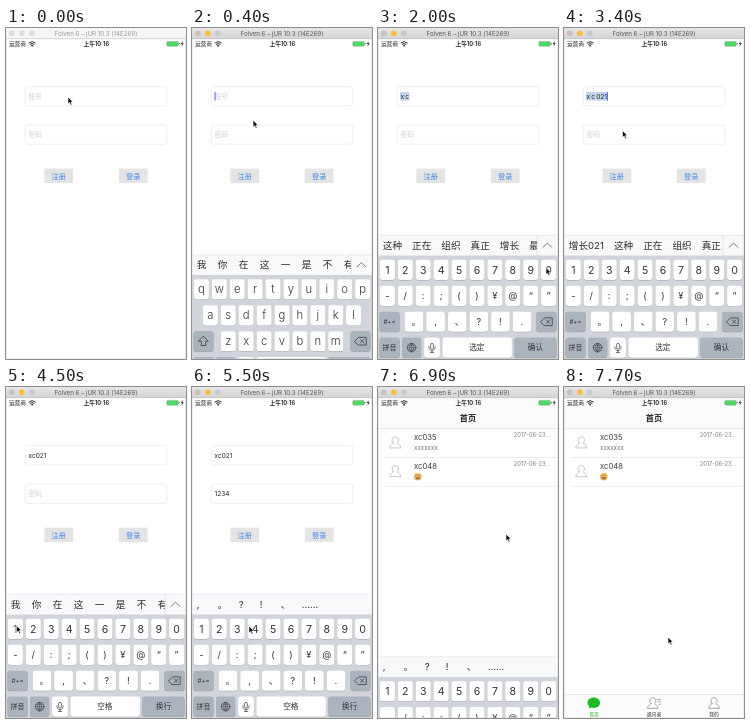
These frames come from a looping animation (180x331 px, 8 s). An HTML page:

```html
<!DOCTYPE html>
<html lang="zh-CN">
<head>
<meta charset="utf-8">
<title>登录演示</title>
<style>
  html, body { margin: 0; width: 100%; height: 100%; overflow: hidden; background: #fff; }
  svg { display: block; width: 180px; height: 331px; }
  text { font-family: Inter, "Noto Sans CJK SC", "Noto Sans CJK", sans-serif; white-space: pre; }
  .line { fill: none; stroke-linecap: round; stroke-linejoin: round; }
</style>
</head>
<body>
<svg id="stage" viewBox="0 0 180 331" xmlns="http://www.w3.org/2000/svg">
  <defs>
    <linearGradient id="chrome" x2="0" y2="1">
      <stop stop-color="#e6e6e6"/><stop offset="1" stop-color="#d3d3d3"/>
    </linearGradient>
    <clipPath id="barClip"><rect id="barWindow" y="409" width="331" height="42"/></clipPath>
    <clipPath id="screenClip"><rect width="375" height="667"/></clipPath>
  </defs>
  <rect width="180" height="331" fill="#fff"/>
  <!-- The phone screen is laid out in its own 375 x 667 points -->
  <g transform="translate(0 11) scale(.48)" clip-path="url(#screenClip)">
    <g id="login"></g>
    <g id="home"></g>
    <g id="status"></g>
    <g id="keyboard"></g>
  </g>
  <g id="titleBar"></g>
  <path d="M.25 10V330.75H179.75V10" fill="none" stroke="#d4d4d4" stroke-width=".5"/>
  <path id="cursor" d="M0 0V7L1.6 5.6L2.8 8.2L4 7.6L2.9 5.1H5Z" fill="#111" stroke="#fff" stroke-width=".6"/>
</svg>
<script>
const LOOP = 8000, STEP = 100;
const $ = id => document.getElementById(id);

const label = (str, x, y, size, fill = '#222', anchor = 'middle', weight = 400, id = '') =>
  `<text ${id && `id="${id}"`} x="${x}" y="${y + size * .36}" font-size="${size}" fill="${fill}"
    text-anchor="${anchor}" font-weight="${weight}">${str}</text>`;
const box = (x, y, w, h, fill, r = 0, extra = '') =>
  `<rect x="${x}" y="${y}" width="${w}" height="${h}" rx="${r}" fill="${fill}" ${extra}/>`;
const line = (d, color, width = 1.5) =>
  `<path class="line" d="${d}" stroke="${color}" stroke-width="${width}"/>`;
const show = (id, on) => $(id).setAttribute('visibility', on ? 'visible' : 'hidden');

// ---- window title and status bar
const dots = colors => colors.map((c, i) =>
  `<circle cx="${5.8 + i * 10}" cy="5.3" r="2.8" fill="${c}"/>`).join('');
$('titleBar').innerHTML =
  box(0, 0, 180, 11, '#f6f6f6', 0, 'id="chromeFill"') +
  '<path d="M0 10.7H180" stroke="#bdbdbd" stroke-width=".6"/>' +
  `<g id="idleDots">${dots(['#dcdcdc', '#dcdcdc', '#dcdcdc'])}</g>` +
  `<g id="liveDots">${dots(['#cbbfb8', '#fdbc40', '#c9c9c9'])}</g>` +
  label('Folven 6 – jUR 10.3 (14E269)', 90, 5.4, 6.2, '#555', 'middle', 400, 'windowTitle');

$('status').innerHTML =
  label('运营商', 6, 10, 12, '#222', 'start') +
  line('M48 8Q54.5 2.5 61 8M50.5 11Q54.5 7.5 58.5 11', '#222', 2) +
  '<circle cx="54.5" cy="14" r="1.8" fill="#222"/>' +
  label('上午10:16', 188, 10, 12, '#222', 'middle', 600) +
  box(335, 5, 24, 10, '#4cd964', 2.5, 'stroke="#8a8a8a" stroke-width=".8"') +
  box(360, 8, 1.6, 4, '#777', .8) +
  '<path d="M368 4L364 10.5H366.8L365.5 16L370 9H367.2Z" fill="#222"/>';

// ---- login form
const field = (id, y, hint) =>
  box(40, y, 295, 40, '#fff', 5, 'stroke="#e4e4e4" stroke-width="1.2"') +
  box(46, y + 11, 0, 18, '#c3d4ec', 0, `id="${id}Mark"`) +
  label(hint, 47, y + 20.5, 14, '#cfcfd3', 'start', 400, id + 'Hint') +
  label('', 47, y + 20.5, 13.6, '#222', 'start', 400, id) +
  box(0, y + 11, 2, 18, '#426bf2', 0, `id="${id}Caret"`);
const button = (str, x) => box(x, 270, 60, 30, '#e4e4e4') + label(str, x + 30, 285.5, 15, '#3a87ee');
$('login').innerHTML = box(0, 0, 375, 667, '#fff') +
  field('user', 99.3, '账号') + field('pass', 179.3, '密码') +
  button('注册', 80) + button('登录', 235);

// ---- home page
const person = (x, y, s, color) =>
  `<g transform="translate(${x} ${y}) scale(${s})">` +
  line('M-4 1C-8 -3 -7 -11 0 -11S8 -3 4 1C4 4 11 4 11 11H-11C-11 4 -4 4 -4 1Z', color, 1.6) + '</g>';
const row = (y, name) => person(36, y + 28.5, 1.05, '#b9b9b9') +
  label(name, 75, y + 18, 16, '#3a3a3a', 'start') +
  label('2017-06-23...', 359, y + 13, 11.9, '#808080', 'end') +
  line(`M15 ${y + 60}H375`, '#dadada', 1);
const laugh = (x, y) => `<g transform="translate(${x} ${y})">
  <circle r="8" fill="#f3bd5c"/>
  <path d="M-5 1H5Q4 6 0 6T-5 1Z" fill="#a9673c"/>
  <path class="line" d="M-5 -2L-3 -4L-1 -2M1 -2L3 -4L5 -2" stroke="#8a5a30" stroke-width="1.2"/>
  <ellipse cx="-7" cy="2" rx="1.6" ry="2.2" fill="#8fbfe0"/></g>`;
const tab = (str, x, color) => label(str, x, 658.5, 10, color, 'middle', 500);
$('home').innerHTML = box(0, 0, 375, 667, '#fff') + box(0, 0, 375, 64, '#fbfbfb') +
  line('M0 64H375', '#cfcfcf', 1) + label('首页', 187.5, 42, 17, '#222', 'middle', 600) +
  row(64, 'xc035') + label('xxxxxxx', 75, 104.5, 13, '#777', 'start') +
  row(124, 'xc048') + laugh(83, 164) +
  box(0, 618, 375, 49, '#fcfcfc') + line('M0 618H375', '#c8c8c8', 1) +
  '<path d="M62 624C54 624 49 629 49 635C49 639 51 641 53 643L52 647L57 645C69 648 75 641 75 635C75 629 70 624 62 624Z" fill="#1fb922"/>' +
  person(185, 635.5, 1, '#8a8a8a') + line('M194 628H201M196 633H201M198 638H201', '#8a8a8a') +
  person(312.5, 635.5, 1, '#8a8a8a') +
  tab('首页', 62.5, '#1fb922') + tab('通讯录', 187.5, '#333') + tab('我的', 312.5, '#333');

// ---- keyboard
const GREY = '#abb3bd', INK = '#333', PITCH = 37.33;
const rowY = i => 460 + 54 * i;
const cap = (x, r, w, fill = '#fff') =>
  box(x, rowY(r) + 1, w, 42, '#9b9ea3', 5) + box(x, rowY(r), w, 42, fill, 5);
// Full-width punctuation sits in the left of its cell, so nudge it to the middle
const key = (str, cx, r, w, size, weight) => cap(cx - w / 2, r, w) +
  label(str, cx + ('。、'.includes(str) ? size / 4 : 0), rowY(r) + 21, size, INK, 'middle', weight);
const keys = (chars, r, size, weight = 400, pitch = PITCH, w = 31.5) => [...chars].map((c, i) =>
  key(c, 187.5 + (i - (chars.length - 1) / 2) * pitch, r, w, size, weight)).join('');
const word = (str, x, id) => label(str, x, 643, 16, INK, 'middle', 400, id);

const letters = keys('qwertyuiop', 0, 23.5, 300) + keys('asdfghjkl', 1, 23.5, 300) +
  keys('zxcvbnm', 2, 23.5, 300) +
  cap(3, 2, 42, GREY) + line('M24 579L34 589H28.500V598H19.500V589H14Z', INK) +
  cap(3, 3, 42, GREY) + word('123', 24);
const digits = keys('1234567890', 0, 22) + keys('-/:;()¥@“”', 1, 19.5) +
  keys('。,、?!.', 2, 20, 400, 45, 39) +
  cap(3, 2, 42, GREY) + label('#+=', 24, 589, 13, INK) +
  cap(3, 3, 42, GREY) + label('拼音', 24, 643, 14.5, INK);
const shared = cap(330, 2, 42, GREY) +
  line('M339 589L347 581H363V597H347ZM351 585.500L358 592.500M358 585.500L351 592.500', INK) +
  cap(50, 3, 40, GREY) +
  `<circle class="line" cx="70" cy="643" r="9" stroke="${INK}" stroke-width="1.3"/>` +
  line('M61 643H79M70 634V652M63 638H77M63 648H77M70 634Q61 643 70 652Q79 643 70 634', INK, 1) +
  cap(96, 3, 33) +
  line('M109.500 637A3 3 0 0 1 115.500 637V643A3 3 0 0 1 109.500 643ZM106 641Q106 649 112.500 649T119 641M112.500 649V653M109 653H116', INK, 1.4) +
  cap(134, 3, 145) + word('', 206, 'spaceKey') +
  cap(284, 3, 88, GREY) + word('', 328, 'enterKey');

$('keyboard').innerHTML = box(0, 409, 375, 42, '#f8f9fa') + line('M0 409H375', '#d5d7da', 1) +
  box(0, 451, 375, 216, '#d1d5db') +
  '<g id="bar" clip-path="url(#barClip)"></g>' +
  `<g id="chevron">${line('M331.500 409V451', '#cdd0d4', 1)}${line('M344 434L353 425L362 434', '#777', 2)}</g>` +
  `<g id="letters">${letters}</g><g id="digits">${digits}</g>` + shared;

// ---- timeline
const userText = [[0, ''], [1000, 'x'], [1200, 'x\u2009c'], [2100, 'x\u2009c\u20090'],
  [2500, 'x\u2009c\u200902'], [2900, 'x\u2009c\u2009021'], [3600, 'xc021']];
const passText = [[0, ''], [4600, '1'], [4900, '12'], [5300, '123'], [5500, '1234'],
  [5700, '12345'], [5900, '123456']];
const words = '这种 正在 组织 真正 增长 最近';
const common = '我 你 在 这 一 是 不 有';
const barText = [[0, common], [1000, '在 这 中 只 再 最 着 做'], [1200, words], [2100, '增长0 ' + words],
  [2500, '增长02 ' + words], [2900, '增长021 ' + words], [3600, common], [4600, ', 。 ? ! 、 ……']];
// time, x, y of the pointer tip
const pointer = [[0, 62, 69], [300, 62, 69], [800, 53, 291], [1000, 53, 291], [1200, 70, 292],
  [1300, 23.5, 305], [1500, 12, 317], [1900, 160, 248], [2000, 168, 239.5], [2200, 168, 239.5],
  [2500, 27, 239], [2700, 11, 240], [2900, 11, 240], [3200, 58.5, 102.5], [3700, 58.5, 102.5],
  [4300, 10.5, 238.5], [4600, 10.5, 238.5], [4900, 29, 239], [5200, 29, 239], [5900, 100, 239],
  [6000, 120, 225], [6400, 155, 172], [6500, 155, 172], [6700, 128, 147], [6900, 128, 147],
  [7500, 104, 250], [LOOP, 104, 250]];

const latest = (list, t) => list.filter(e => e[0] <= t).pop()[1];
const ramp = (t, a, b) => {
  const p = Math.min(1, Math.max(0, (t - a) / (b - a)));
  return p * p * (3 - 2 * p);
};

function drawField(id, text, focused, marked, t) {
  $(id).textContent = text;
  show(id + 'Hint', !text);
  const w = text ? $(id).getComputedTextLength() : 0;
  $(id + 'Mark').setAttribute('width', marked ? w + 2 : 0);
  $(id + 'Caret').setAttribute('x', 47 + w);
  const phase = t % 1000;
  show(id + 'Caret', focused && phase >= 100 && phase < 500);
}

let shownBar;
function drawBar(text) {
  if (text === shownBar) return;
  shownBar = text;
  const bar = $('bar'), plain = text[0] === ',';
  bar.innerHTML = '';
  let x = 10;
  for (const item of text.split(' ')) {
    bar.insertAdjacentHTML('beforeend', label(item, x, 430, 20, '#2a2a2a', 'start'));
    x += item.length === 1 ? 43.7 : bar.lastChild.getComputedTextLength() + 21;
  }
  show('chevron', !plain);
  $('barWindow').setAttribute('width', plain ? 375 : 331);
}

function draw(t) {
  const live = t >= 100, home = t >= 6800;
  const marking = t >= 1000 && t < 3600, numeric = t >= 1500;
  $('chromeFill').setAttribute('fill', live ? 'url(#chrome)' : '#f6f6f6');
  $('windowTitle').setAttribute('fill', live ? '#555' : '#999');
  show('liveDots', live);
  show('idleDots', !live);
  show('home', home);
  show('login', !home);
  drawField('user', latest(userText, t), !home && live && t < 3600, marking && !home, t);
  drawField('pass', latest(passText, t), !home && t >= 3600, false, t);
  if (home) ['user', 'pass'].forEach(id => show(id + 'Hint', false));

  const up = ramp(t, 100, 500) - ramp(t, 6700, 7100);
  $('keyboard').setAttribute('transform', `translate(0 ${260 * (1 - up)})`);
  $('letters').style.display = numeric ? 'none' : '';
  $('digits').style.display = numeric ? '' : 'none';
  $('spaceKey').textContent = marking ? '选定' : '空格';
  $('enterKey').textContent = marking ? '确认' : '换行';
  drawBar(latest(barText, t));

  const i = pointer.findIndex(p => p[0] > t);
  const [t0, x0, y0] = pointer[i - 1], [t1, x1, y1] = pointer[i];
  const k = ramp(t, t0, t1);
  $('cursor').setAttribute('transform', `translate(${x0 + (x1 - x0) * k} ${y0 + (y1 - y0) * k})`);
}

let start, drawn;
function tick(now) {
  start ??= now;
  const t = Math.floor((now - start) % LOOP / STEP) * STEP;
  if (t !== drawn) draw(drawn = t);
  requestAnimationFrame(tick);
}
draw(0);
requestAnimationFrame(tick);
</script>
</body>
</html>
```
